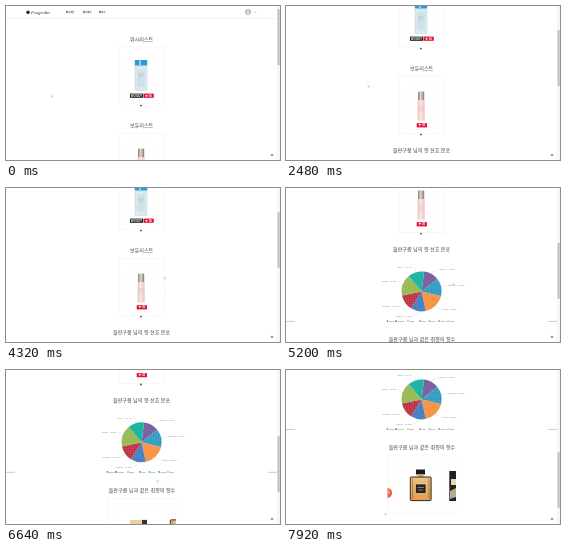
These frames come from a looping animation (274 px wide and 154 px high, 8000 ms). An HTML page:

```html
<!DOCTYPE html>
<html lang="ko">
<head>
<meta charset="utf-8">
<style>
  html, body { margin: 0; height: 100%; overflow: hidden; background: #fff; }
  svg { display: block; width: 100vw; height: 100vh; }
  text { font-family: "Noto Sans CJK KR", "Noto Sans CJK", sans-serif; fill: #444; }
  .title { font-size: 5.1px; font-weight: 500; text-anchor: middle; }
  .nav { font-size: 2.3px; font-weight: 700; }
  .logo { font: italic 4.3px "Noto Serif", serif; fill: #333; }
  .small { font-family: "Open Sans", sans-serif; font-size: 2.2px; fill: #777; }
  .legend { font-size: 1.8px; fill: #444; }
  .badge { font: bold 2.9px "Open Sans", "DejaVu Sans", sans-serif; fill: #fff; text-anchor: middle; }
  .card { fill: #fff; stroke: #efefef; stroke-width: .5; }
  .inner { fill: none; stroke: #f5f5f5; stroke-width: .4; }
  .arrow { fill: none; stroke: #ddd; stroke-width: .4; }
  .link { fill: none; stroke: #bbb; stroke-width: .25; }
</style>
</head>
<body>
<svg viewBox="0 0 274 154" preserveAspectRatio="none">
  <defs>
    <pattern id="dots" width="2.4" height="2.4" patternUnits="userSpaceOnUse">
      <circle cx=".6" cy=".6" r=".42" fill="#fff" opacity=".7"/>
      <circle cx="1.8" cy="1.8" r=".42" fill="#fff" opacity=".7"/>
    </pattern>
    <linearGradient id="cap">
      <stop offset="0" stop-color="#8d8078"/>
      <stop offset=".45" stop-color="#e0d8d2"/>
      <stop offset="1" stop-color="#85766d"/>
    </linearGradient>
    <linearGradient id="pink">
      <stop offset="0" stop-color="#e9bdb6"/>
      <stop offset=".4" stop-color="#fbe6e2"/>
      <stop offset="1" stop-color="#ecc3bc"/>
    </linearGradient>
    <linearGradient id="amber" x2="0" y2="1">
      <stop offset="0" stop-color="#e8c48a"/>
      <stop offset="1" stop-color="#e99a48"/>
    </linearGradient>
    <clipPath id="window"><rect x="101.5" y="300" width="68.5" height="57"/></clipPath>
  </defs>

  <g id="page">
    <circle cx="22" cy="6.2" r="1.7" fill="#222"/>
    <text class="logo" x="25" y="7.5">Fragrolin</text>
    <text class="nav" x="60" y="7">향수리뷰</text>
    <text class="nav" x="77" y="7">향수찾기</text>
    <text class="nav" x="93" y="7">향보기</text>
    <circle cx="242" cy="6" r="3" fill="#b5b8bb"/>
    <circle cx="242" cy="5.2" r="1" fill="#eee"/>
    <path d="M240.2 8a1.8 1.5 0 0 1 3.6 0z" fill="#eee"/>
    <path d="M248.5 5.7l1 1 1-1" fill="none" stroke="#777" stroke-width=".4"/>
    <path d="M0 12.3H271" stroke="#e6e6e6" stroke-width=".5"/>

    <text class="title" x="135.6" y="35">위시리스트</text>
    <rect class="card" x="113" y="41" width="46" height="57"/>
    <rect class="inner" x="122" y="51" width="28" height="44"/>
    <path class="arrow" d="M117 69l-1 1.2 1 1.2M155 69l1 1.2-1 1.2"/>
    <rect x="129" y="60" width="12" height="24.5" rx=".6" fill="#dcebf0" stroke="#bcd2da" stroke-width=".5"/>
    <rect x="131" y="63" width="8" height="18" fill="#cfe2e8"/>
    <path d="M132 68h6M133 70h4" stroke="#8fb0bc" stroke-width=".5"/>
    <rect x="128.8" y="54" width="12.4" height="5.6" rx=".4" fill="#2b9bd6"/>
    <path d="M133 54.3h2v5h-2z" fill="#8fd0f0"/>
    <rect x="124" y="87.6" width="13" height="4.2" fill="#181818"/>
    <text class="badge" x="130.5" y="90.8">WOODY</text>
    <rect x="137.5" y="87.6" width="10.3" height="4.2" fill="#e2143c"/>
    <text class="badge" x="142.7" y="90.8">♥ 36</text>
    <circle cx="135" cy="99.6" r=".9" fill="#444"/>

    <text class="title" x="135.6" y="121">보유리스트</text>
    <rect class="card" x="113" y="127.5" width="46" height="57"/>
    <rect class="inner" x="122" y="138" width="28" height="43"/>
    <path class="arrow" d="M117 155l-1 1.2 1 1.2M155 155l1 1.2-1 1.2"/>
    <rect x="132" y="142.5" width="6.2" height="9" rx=".8" fill="url(#cap)"/>
    <rect x="131.6" y="151.5" width="7.1" height="20" rx=".6" fill="url(#pink)"/>
    <path d="M133 158h4.2M133 160h4.2M133.5 162h3.2" stroke="#d3a19c" stroke-width=".35"/>
    <rect x="130.7" y="174.2" width="10.3" height="4.2" fill="#e2143c"/>
    <text class="badge" x="135.9" y="177.4">♥ 36</text>
    <circle cx="135" cy="185.6" r=".9" fill="#444"/>

    <text class="title" x="135.6" y="203">들판구름 님의 향 선호 분포</text>
    <g id="chart"></g>
    <path d="M0 273.4H9M262 273.4H271" stroke="#aaa" stroke-width=".6"/>

    <text class="title" x="136" y="293">들판구름 님과 같은 취향의 향수</text>
    <rect class="card" x="102" y="300" width="68" height="57"/>
    <rect class="inner" x="111" y="309" width="49" height="39"/>
    <g clip-path="url(#window)"><g id="slides">
      <g>
        <rect x="84" y="321" width="12" height="24" fill="#ecd2a0"/>
        <rect x="96" y="321" width="5" height="24" fill="#3c322b"/>
        <circle cx="101.3" cy="337" r="4.8" fill="#e8604f"/>
        <circle cx="100.8" cy="336" r="2.8" fill="#f3a08c"/>
      </g>
      <g>
        <rect x="130" y="313.5" width="9" height="5" fill="#1d1a18"/>
        <rect x="131.5" y="318" width="6" height="2.8" fill="#c8a56a"/>
        <rect x="124.3" y="321" width="20.8" height="23.6" rx=".8" fill="url(#amber)" stroke="#33261c"/>
        <path d="M126.5 322.5v20.5M142.9 322.5v20.5" stroke="#8a5a30" stroke-width=".6"/>
        <rect x="129.4" y="328" width="10.6" height="9.4" fill="#2c2420" stroke="#f0dcae" stroke-width=".6"/>
        <path d="M131.5 331.5h6.4M132.3 334h4.8" stroke="#e8cf9c" stroke-width=".5"/>
      </g>
      <g>
        <rect x="163.3" y="315" width="20" height="30" fill="#26211e"/>
        <rect x="165" y="323" width="5" height="6" fill="#e6d6b8"/>
        <path d="M164 335l6-3v9l-6 2z" fill="#b9a68c"/>
      </g>
    </g></g>
  </g>

  <rect x="271" width="3" height="154" fill="#f6f6f6"/>
  <rect id="thumb" x="271.5" width="2.2" height="56" fill="#c1c1c1"/>
  <circle cx="266" cy="149" r="1.3" fill="#b0b0b0"/>
  <path d="M265.3 149.3l.7-.8.7.8" fill="none" stroke="#444" stroke-width=".5"/>
  <path id="cursor" d="M0-1.2V1.1l.6-.5.4.9.3-.1-.4-.9h.8z" fill="#fff" stroke="#999" stroke-width=".3"/>
</svg>
<script>
const $ = id => document.getElementById(id);
const CX = 135.6, CY = 243.4, R = 20;

// name, colour, end angle, dotted, label x and y from the centre, share
const slices = [
  ['floral', '#7d62a3', 51, 0, 18.5, -21, '15.28%'],
  ['marine', '#1f93bb', 104, 1, 26.5, -5, '12.22%'],
  ['citrus', '#f79646', 168, 0, 20.5, 18.5, '18.33%'],
  ['woody', '#4a83c4', 212, 0, -25.5, 25.5, '12.50%'],
  ['oriental', '#b81f35', 258, 1, -39.5, 16, '13.61%'],
  ['green', '#9bbb59', 320, 0, -39.5, -9.5, '16.94%'],
  ['fruity', '#1fb5a5', 367, 0, -24.5, -23.6, '11.11%']
];
const point = (deg, r) => {
  const a = deg * Math.PI / 180;
  return (CX + r * Math.sin(a)).toFixed(2) + ' ' + (CY - r * Math.cos(a)).toFixed(2);
};
let start = 7, chart = '';
slices.forEach(([name, color, end, dotted, x, y, share]) => {
  const d = `M${CX} ${CY}L${point(start, R)}A${R} ${R} 0 0 1 ${point(end, R)}Z`;
  const mid = (start + end) / 2, edge = CX + x + (x < 0 ? 16.5 : -.5);
  chart += `<path d="${d}" fill="${color}"/>`;
  if (dotted) chart += `<path d="${d}" fill="url(#dots)"/>`;
  chart += `<path class="link" d="M${point(mid, R)}L${point(mid, R + 2.5)}L${edge} ${CY + y - .7}"/>
    <text class="small" x="${CX + x}" y="${CY + y}">${name} : ${share}</text>`;
  start = end;
});
[3, 4, 5, 0, 6, 1, 2].forEach((k, i) => {
  const x = [101.5, 110, 122, 134, 143.5, 153, 162][i];
  chart += `<circle cx="${x}" cy="273" r=".85" fill="${slices[k][1]}"/>
    <text class="small legend" x="${x + 1.4}" y="273.7">${slices[k][0]}</text>`;
});
$('chart').innerHTML = chart;

// keys: [time, value, value...]
const scrollKeys = [[1560, 0], [1760, 16], [2080, 40], [2400, 57], [4480, 57], [4800, 98],
  [5160, 140], [6260, 140], [6640, 171], [7020, 214]];
const cursorKeys = [[0, 45, 90], [400, 45, 90], [960, 78, 76], [1520, 81, 75], [2480, 82, 80],
  [2720, 82, 80], [3440, 158, 90], [4320, 158, 90], [5200, 167, 96], [5440, 167, 96],
  [6080, 151, 111], [6640, 151, 111], [7120, 100, 143], [7920, 99, 144]];
const slideKeys = [[7120, 40], [7280, 14], [7440, 0]];

function at(keys, t) {
  const n = keys.findIndex(k => k[0] > t);
  if (n === 0) return keys[0].slice(1);
  if (n < 0) return keys[keys.length - 1].slice(1);
  const a = keys[n - 1], b = keys[n], p = (t - a[0]) / (b[0] - a[0]);
  return a.slice(1).map((v, i) => v + (b[i + 1] - v) * p);
}
const move = (id, x, y) => $(id).setAttribute('transform', `translate(${x} ${y})`);

function draw(now) {
  const t = now % 8000, [scroll] = at(scrollKeys, t);
  move('page', 0, -scroll);
  move('thumb', 0, 3 + scroll * .37);
  move('slides', at(slideKeys, t)[0], 0);
  move('cursor', ...at(cursorKeys, t));
  requestAnimationFrame(draw);
}
draw(performance.now());
</script>
</body>
</html>
```
